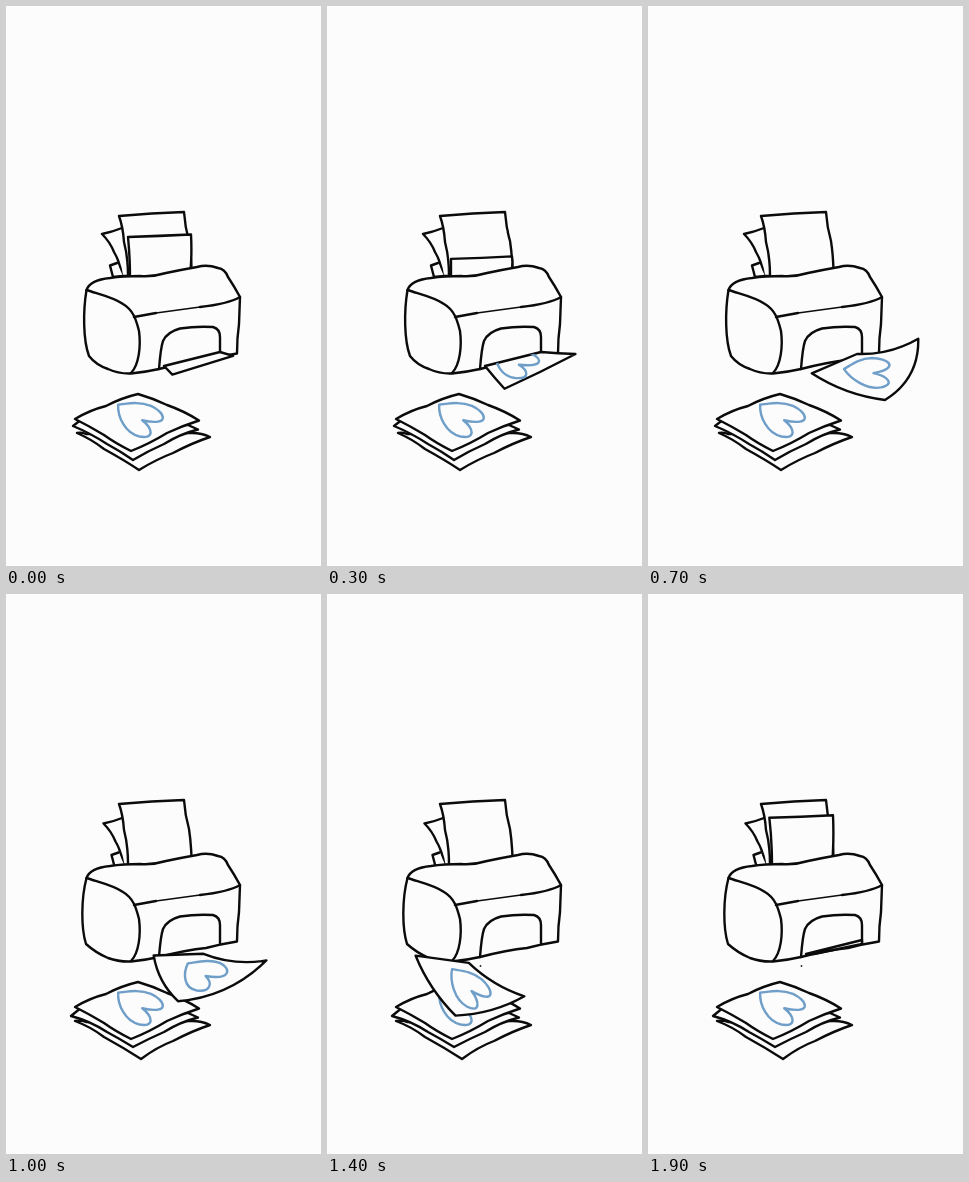
An HTML page that plays this animation: 315 px wide and 560 px high, repeating every 2 s.

```html
<!DOCTYPE html>
<html lang="en">
<head>
<meta charset="utf-8">
<title>Printer</title>
<style>
  html, body { margin: 0; width: 100%; height: 100%; overflow: hidden; background: #fcfcfc; }
  svg { display: block; width: 100%; height: 100%; }
  path { stroke: #0b0b0b; stroke-width: 2.4; stroke-linecap: round; stroke-linejoin: round; fill: none; }
  .paper { fill: #fcfcfc; }
  .thin { stroke-width: 1.5; }
  .heart { stroke: #6f9fc9; vector-effect: non-scaling-stroke; }
</style>
</head>
<body>
<svg viewBox="0 0 315 560">
  <defs><clipPath id="cut"><path id="cutPath"/></clipPath></defs>
  <g id="spare">
    <path class="paper" d="M116 222Q106 226 96 228Q104 236 108 246Q114 256 116 270L124 270"/>
    <path class="paper" d="M111 257L104 259.500L107 271L117 270"/>
  </g>
  <path class="paper" d="M122 270Q122 251 118 236Q117 221 113 210Q146 207 178 206Q179 221 183 235Q185 248 185.500 264"/>
  <path id="feed" class="paper"/>
  <path id="body" class="paper"/>
  <path d="M80.500 284C92 288 107 291 117 298C127 304 130 313 133 325C135 340 133 359 125 367"/>
  <path d="M128 311Q139 309 150 307M194 301Q222 298 234 291"/>
  <path class="thin" d="M150 307Q172 304 194 301"/>
  <path d="M153 363C154 350 155 341 157 335Q161 326 174 322.500Q190 320 207 321Q214 323 214 331L214 349"/>
  <circle id="dot" cx="153.500" cy="372" r=".9" fill="#222"/>
  <path id="low" class="paper"/>
  <path id="mid" class="paper"/>
  <path class="paper" d="M69 413Q84 404 100 400Q115 392 132 388Q146 392 161 399Q178 405 193 414.500Q176 420 161 427Q143 438 125 445Q109 437 98 429Q83 420 69 413Z"/>
  <path id="topHeart" class="heart"/>
  <path id="sheet" class="paper"/>
  <g clip-path="url(#cut)"><path id="sheetHeart" class="heart"/></g>
</svg>
<script>
const $ = id => document.getElementById(id);
const set = (id, d) => $(id).setAttribute('d', d);
const show = (id, on) => { $(id).style.display = on ? '' : 'none'; };
const mix = (a, b, k) => a + (b - a) * k;
const add = (p, x, y) => [p[0] + x, p[1] + y];

// swing of a loose sheet: time, middle x and y, tilt in degrees, lean of the front corner
const SWING = [
  [700, 217, 350, -18, 20],
  [850, 240, 354, -7, -4],
  [1000, 204, 364, 2.5, -32],
  [1200, 156, 372, 27, -25],
  [1600, 130, 392, 14, -4],
  [1900, 131, 414, 0, -6]
];

function swingAt(t) {
  const i = SWING.findIndex(s => s[0] > t), a = SWING[i - 1], b = SWING[i];
  return a.map((v, j) => mix(v, b[j], (t - a[0]) / (b[0] - a[0])));
}

// the sheet grows out of the slot, its back edge held in place
function printing(t) {
  const k = (t + 100) / 800, slip = k ** 8;
  const a = [158 + 6 * slip, 360 + 7 * slip], d = [214 - 5 * slip, 346];
  return {
    a, d,
    b: add(a, 8 + 65 * k ** 2.5, 26 * (1 - (1 - k) ** 3)),
    c: add(d, 56 * k ** 0.7, 4 - 16 * k ** 3),
    sag: 8 * k ** 4, bulge: 18 * k ** 4, sink: 8 * k,
    hidden: [-54 * (1 - k), -130 * (1 - k) ** 4]
  };
}

// the sheet drifts down to the pile and flattens
function falling(t) {
  const [, x, y, tilt, lean] = swingAt(t);
  const curl = 1 - ((t - 700) / 1200) ** 2, span = 62 - 6 * curl;
  const dx = span * Math.cos(tilt * Math.PI / 180), dy = span * Math.sin(tilt * Math.PI / 180);
  return {
    a: [x - dx, y - dy],
    b: [x + lean, y + 31 + 13 * curl],
    c: [x + dx, y + dy],
    d: [x + 4 - 12 * curl ** 2, y - 26 + 24 * curl ** 1.5],
    sag: 9 * Math.sqrt(curl), bulge: 20 * curl ** 2, sink: 8 * Math.sqrt(curl),
    hidden: [0, 0]
  };
}

// control point pushed sideways from the middle of p-q
function bend(p, q, amount) {
  const dx = q[0] - p[0], dy = q[1] - p[1], len = Math.hypot(dx, dy);
  return [(p[0] + q[0]) / 2 - dy / len * amount, (p[1] + q[1]) / 2 + dx / len * amount];
}

function outline({ a, b, c, d, sag, bulge }) {
  return `M${a}Q${bend(a, b, sag)} ${b}Q${bend(b, c, bulge)} ${c}Q${bend(d, c, sag)} ${d}Z`;
}

// pins the heart's tip and lobes to fixed spots on the sheet
function placeHeart(id, { a, b, c, d, sink, hidden }) {
  const a2 = add(a, ...hidden), d2 = add(d, ...hidden);
  const spot = (u, v) => [0, 1].map(i =>
    mix(mix(a2[i], b[i], u), mix(d2[i], c[i], u), v) + i * sink);
  const [x, y] = spot(.056, .632), l = spot(.578, .82), m = spot(.77, .267);
  $(id).setAttribute('transform', `matrix(${[l[0] - x, l[1] - y, m[0] - x, m[1] - y, x, y]})`);
}

// n = 0 or 1: two slightly different redraws of the same lines
function drawInk(n) {
  set('body', `M80.500 284C${77 - 2 * n} 305 ${77 - 2 * n} 334 ${83 - 3 * n} 350Q90 359 102 ${363 + n}` +
    'Q113 368 125 367.500Q140 366 153 363Q180 356 200 354Q215 350 231 347.500' +
    'Q231 332 233 318L234 291Q228 280 222 271Q219 263 212 262Q201 258 191 261' +
    'Q174 264 160 267Q147 271 134 270Q117 270 104 272Q84 274 80.500 284Z');
  set('low', `M80 428Q75 426 ${71 - 2 * n} 427Q85 433 98 443Q118 454 ${133 + 2 * n} ${464 + n}` +
    'Q151 453 167 447Q186 437 204 431Q196 427 186 427Z');
  set('mid', `M76 413L${67 - 2 * n} ${420 + 2 * n}Q84 427 101 438Q114 445 127 ${454 - n}` +
    'Q142 445 158 438Q174 428 192 423.500L182 419Z');
  $('spare').setAttribute('transform', `translate(${1.5 * n} ${1.5 * n})`);
  show('dot', n);
}

// the next blank page comes up, then sinks into the printer
function drawFeed(t) {
  const x = 122 + t / 150, y = 231 + .073 * t;
  set('feed', `M124 271Q124 ${(y + 271) / 2} ${x} ${y}Q${x + 31} ${y - 1} 185 ${y - 2.5}Q186 ${(y + 264) / 2} 184.500 265`);
  show('feed', t >= -300 && t < 550);
}

function draw(now) {
  const t = Math.floor(now / 100) * 100 % 2000;
  drawInk(t < 800 ? 0 : 1);
  drawFeed(t < 1000 ? t : t - 2000);

  const page = t >= 700 && t < 1900 ? falling(t) : printing(t === 1900 ? -100 : t);
  const d = outline(page);
  set('sheet', d);
  set('cutPath', d);
  placeHeart('sheetHeart', page);
}

const heart = 'M0 0C.3 -.13 .6 -.3 .85 -.22C1.12 -.1 1.08 .38 .4 .38C.55 .6 .45 .98 .08 1C-.25 1 -.2 .45 0 0Z';
set('topHeart', heart);
set('sheetHeart', heart);
placeHeart('topHeart', { a: [69, 413], b: [125, 445], c: [193, 414], d: [132, 388], sink: 0, hidden: [0, 0] });

function loop() {
  draw(performance.now());
  requestAnimationFrame(loop);
}
loop();
</script>
</body>
</html>
```
